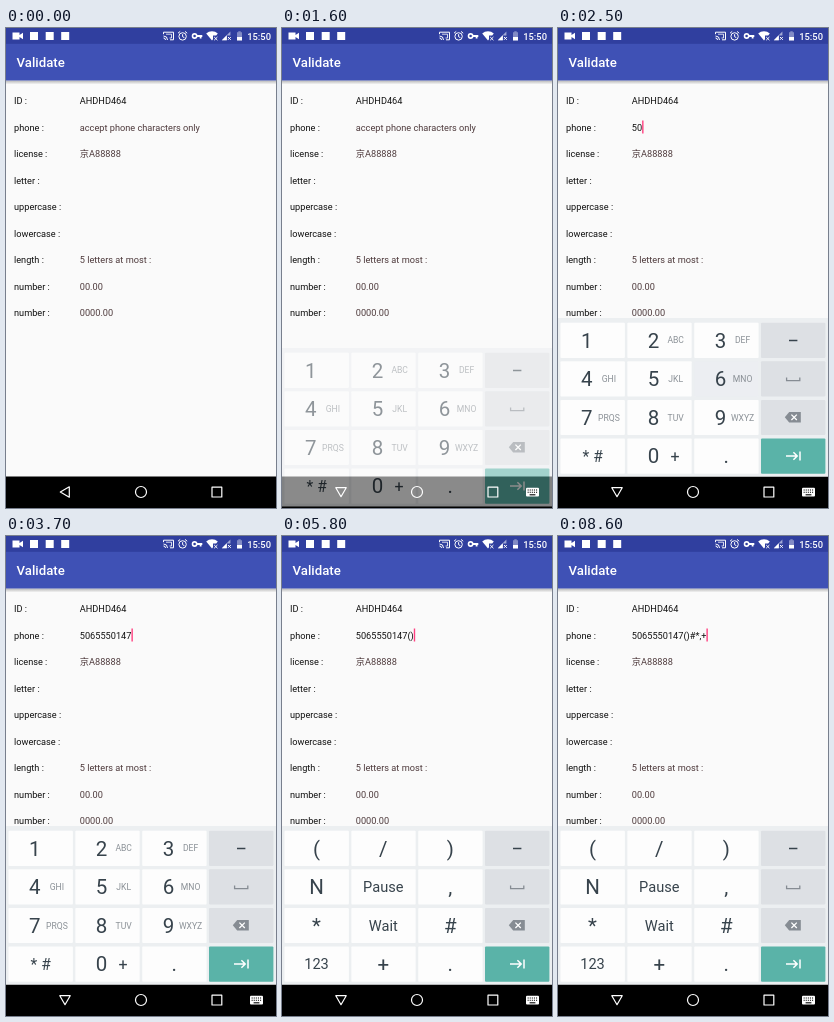
An HTML page that plays this animation: 270 px wide and 480 px high, repeating every 9000 ms.

```html
<!DOCTYPE html>
<html lang="en">
<head>
<meta charset="utf-8">
<title>Validate</title>
<style>
  html, body { margin: 0; width: 100%; height: 100%; overflow: hidden; background: #fafafa; }
  svg { display: block; width: 100vw; height: 100vh; }
  text { font-family: Roboto, "Noto Sans CJK SC", "Noto Sans CJK", sans-serif; white-space: pre; }
  .mid { text-anchor: middle; }
</style>
</head>
<body>
<svg id="stage" viewBox="0 0 270 480" xmlns="http://www.w3.org/2000/svg">
  <defs>
    <linearGradient id="shade" x2="0" y2="1">
      <stop stop-color="#000" stop-opacity=".27"/>
      <stop offset="1" stop-color="#000" stop-opacity="0"/>
    </linearGradient>
  </defs>
  <rect width="270" height="480" fill="#fafafa"/>
  <rect y="52.5" width="270" height="4" fill="url(#shade)"/>
  <rect width="270" height="52.5" fill="#3f51b5"/>
  <rect width="270" height="15.8" fill="#303f9f"/>
  <text x="10.6" y="39.2" font-size="13.2" font-weight="500" fill="#fff">Validate</text>

  <g id="status" fill="#fff">
    <path d="M6.5 4.5h7v2.6l3.5-2.4v6.6l-3.5-2.4v2.6h-7z"/>
    <rect x="24" y="4" width="8" height="8"/>
    <rect x="39.7" y="4" width="8" height="8"/>
    <rect x="55.2" y="4" width="8" height="8"/>
    <g fill="none" stroke="#fff">
      <path d="M157.5 6.2v-2h10v7.6h-3.5M157.5 8a4 4 0 0 1 4 4M157.5 10a2 2 0 0 1 2 2"/>
      <path d="M160 6.2h5.5v3.8h-2" stroke-width=".8"/>
      <circle cx="176.6" cy="8.4" r="3.7"/>
      <path d="M176.6 6.2v2.5l1.8 1M172 5.2l2.2-1.8M181.2 5.2l-2.2-1.8"/>
      <circle cx="188.6" cy="8" r="2.1" stroke-width="1.6"/>
      <path d="M191 8h5.3M194.6 8v2.4" stroke-width="1.8"/>
    </g>
    <path d="M200.2 5.6a8.5 8.5 0 0 1 11.6 0l-1.6 2h-3.2v3.6l-1 1.2z"/>
    <path d="M208.2 9l3.2 3.2M211.4 9l-3.2 3.2" stroke="#fff"/>
    <path d="M215.8 12.2l8.6-8.6v4h-3.6v4.6z" fill-opacity=".55"/>
    <path d="M215.8 12.2l5-5v5z"/>
    <path d="M222 9l2.8 2.8M224.8 9l-2.8 2.8" stroke="#fff"/>
    <path d="M231 4.2h1.3v-1h2.4v1h1.3v8.2h-5z" fill-opacity=".4"/>
    <path d="M231 9h5v3.4h-5z"/>
    <text x="241.2" y="11.6" font-size="9.4" font-weight="500">15:50</text>
  </g>

  <g id="rows" font-size="9.2"></g>
  <rect id="cursor" y="92.5" width="1.4" height="13" fill="#ff4081"/>

  <rect y="448.5" width="270" height="31.5" fill="#000"/>
  <g id="board"></g>

  <g fill="none" stroke="#fff" stroke-width="1.2" stroke-linejoin="round">
    <path id="back" d="M54.3 464L63.3 458.8V469.2Z"/>
    <circle cx="135" cy="464" r="5.5"/>
    <rect x="206" y="459.2" width="9.8" height="9.8"/>
  </g>
  <g id="switcher">
    <rect x="244" y="459.8" width="13" height="8.8" rx="1" fill="#fff"/>
    <path d="M245.6 462h10M245.6 464.2h10" stroke="#000" stroke-width="1.1" stroke-dasharray="1.1 1"/>
    <path d="M247.6 466.8h5.8" stroke="#000" stroke-width="1.1"/>
  </g>
</svg>

<script>
const NS = 'http://www.w3.org/2000/svg';
const LOOP = 9000, STEP = 100;
const INK = '#37434c', HINT = '#4e3a3c';
const COLS = [2.5, 69.3, 136.2, 203], TOP = 294.7, ROW_H = 38.6, KEY_W = 64.4, KEY_H = 35.2;

const $ = id => document.getElementById(id);

function add(parent, tag, attrs, content = '') {
  const el = document.createElementNS(NS, tag);
  for (const k in attrs) el.setAttribute(k, attrs[k]);
  el.textContent = content;
  parent.appendChild(el);
  return el;
}

// Form fields
const fields = [
  ['ID', 'AHDHD464'], ['phone', 'accept phone characters only'], ['license', '京A88888'],
  ['letter', ''], ['uppercase', ''], ['lowercase', ''],
  ['length', '5 letters at most :'], ['number', '00.00'], ['number', '0000.00']
];
const values = fields.map(([name, value], i) => {
  const y = 76.2 + i * 26.5;
  add($('rows'), 'text', { x: 8, y, fill: '#111' }, name + ' :');
  return add($('rows'), 'text', { x: 73.8, y, fill: i ? HINT : '#111' }, value);
});
const phone = values[1], phoneHint = fields[1][1];

// Keyboard
const board = $('board');
add(board, 'rect', { y: 290, width: 270, height: 158.5, fill: '#eceff1' });

const keyY = row => TOP + row * ROW_H;
const midY = row => keyY(row) + KEY_H / 2;

function keyRect(col, row, fill) {
  return add(board, 'rect', { x: COLS[col], y: keyY(row), width: KEY_W, height: KEY_H, rx: 1, fill });
}

const caps = [];
for (let i = 0; i < 12; i++) caps.push(keyRect(i % 3, Math.floor(i / 3), '#fdfdfd'));
for (let r = 0; r < 4; r++) keyRect(3, r, r < 3 ? '#dde0e4' : '#5ab3a8');

function label(page, i, str, dx, size, fill = INK) {
  const row = Math.floor(i / 3);
  add(page, 'text', {
    class: 'mid', x: COLS[i % 3] + dx, y: midY(row) + size * 0.36, 'font-size': size, fill
  }, str);
}

const digitPage = add(board, 'g', {}), symbolPage = add(board, 'g', {});
const hints = ['', 'ABC', 'DEF', 'GHI', 'JKL', 'MNO', 'PRQS', 'TUV', 'WXYZ'];
hints.forEach((letters, i) => {
  label(digitPage, i, String(i + 1), 26.3, 20.5);
  label(digitPage, i, letters, 48.4, 8.6, '#8a9096');
});
label(digitPage, 9, '* #', 32.2, 15.6);
label(digitPage, 10, '0', 26.3, 20.5);
label(digitPage, 10, '+', 47.8, 16);
label(digitPage, 11, '.', 32, 20.5);

const symbols = ['(', '/', ')', 'N', 'Pause', ',', '*', 'Wait', '#', '123', '+', '.'];
symbols.forEach((s, i) => label(symbolPage, i, s, 32, s.length > 1 ? 14.6 : 20.5));

const icon = (d, stroke, width) => add(board, 'path', { d, fill: 'none', stroke, 'stroke-width': width });
icon('M231 312.5h8.4', INK, 1.5);
icon('M228.6 349.6v3h13.2v-3', '#868c93', 1.3);
add(board, 'path', { d: 'M226.8 389.3l4.4-5.3h11.6v10.6h-11.6z', fill: '#868c93' });
icon('M233.4 386.6l5.4 5.4M238.8 386.6l-5.4 5.4', '#fff', 1.3);
icon('M228 428h11M235.4 424.2l3.8 3.8-3.8 3.8M242 423.6v8.8', '#fff', 1.5);

// Typing schedule: [time, character]
const typed = [
  [2000, '5'], [2200, '0'], [2600, '6'], [2700, '5'], [2900, '5'], [3000, '5'],
  [3200, '0'], [3300, '1'], [3500, '4'], [3700, '7'],
  [4500, '('], [4700, ')'], [6400, '#'], [7100, '*'], [7400, ','], [7600, '+']
];
const cursorOff = [[4200, 4500], [5200, 5800], [6300, 6400], [7000, 7100], [8100, 8600]];
const SYMBOLS_AT = 3900;

function keyIndex(ch) {
  if (ch === '0') return 10;
  return ch >= '1' && ch <= '9' ? ch - 1 : symbols.indexOf(ch);
}

function draw(ms) {
  const t = Math.floor(ms / STEP) * STEP;

  const p = Math.min(1, Math.max(0, (t - 1400) / 300));
  board.setAttribute('opacity', p ** 1.5);
  board.setAttribute('transform', `translate(0 ${90 * (1 - p)})`);
  const open = t >= 1600;
  $('back').setAttribute('transform', open ? 'rotate(-90 59 464)' : '');
  $('switcher').setAttribute('visibility', open ? 'visible' : 'hidden');

  const onSymbols = t >= SYMBOLS_AT;
  digitPage.setAttribute('visibility', onSymbols ? 'hidden' : 'visible');
  symbolPage.setAttribute('visibility', onSymbols ? 'visible' : 'hidden');

  const text = typed.filter(([at]) => t >= at).map(([, ch]) => ch).join('');
  phone.textContent = text || phoneHint;
  phone.setAttribute('fill', text ? '#111' : HINT);

  const pressed = typed.find(([at]) => t >= at - STEP && t < at);
  const lit = pressed ? keyIndex(pressed[1]) : -1;
  caps.forEach((cap, i) => cap.setAttribute('fill', i === lit ? '#eceef2' : '#fdfdfd'));

  const shown = t >= 1700 && !cursorOff.some(([a, b]) => t >= a && t < b);
  $('cursor').setAttribute('visibility', shown ? 'visible' : 'hidden');
  $('cursor').setAttribute('x', 73.8 + (text ? phone.getComputedTextLength() : -0.2));
}

const start = performance.now();
function tick() {
  draw((performance.now() - start) % LOOP);
  requestAnimationFrame(tick);
}
tick();
</script>
</body>
</html>
```
